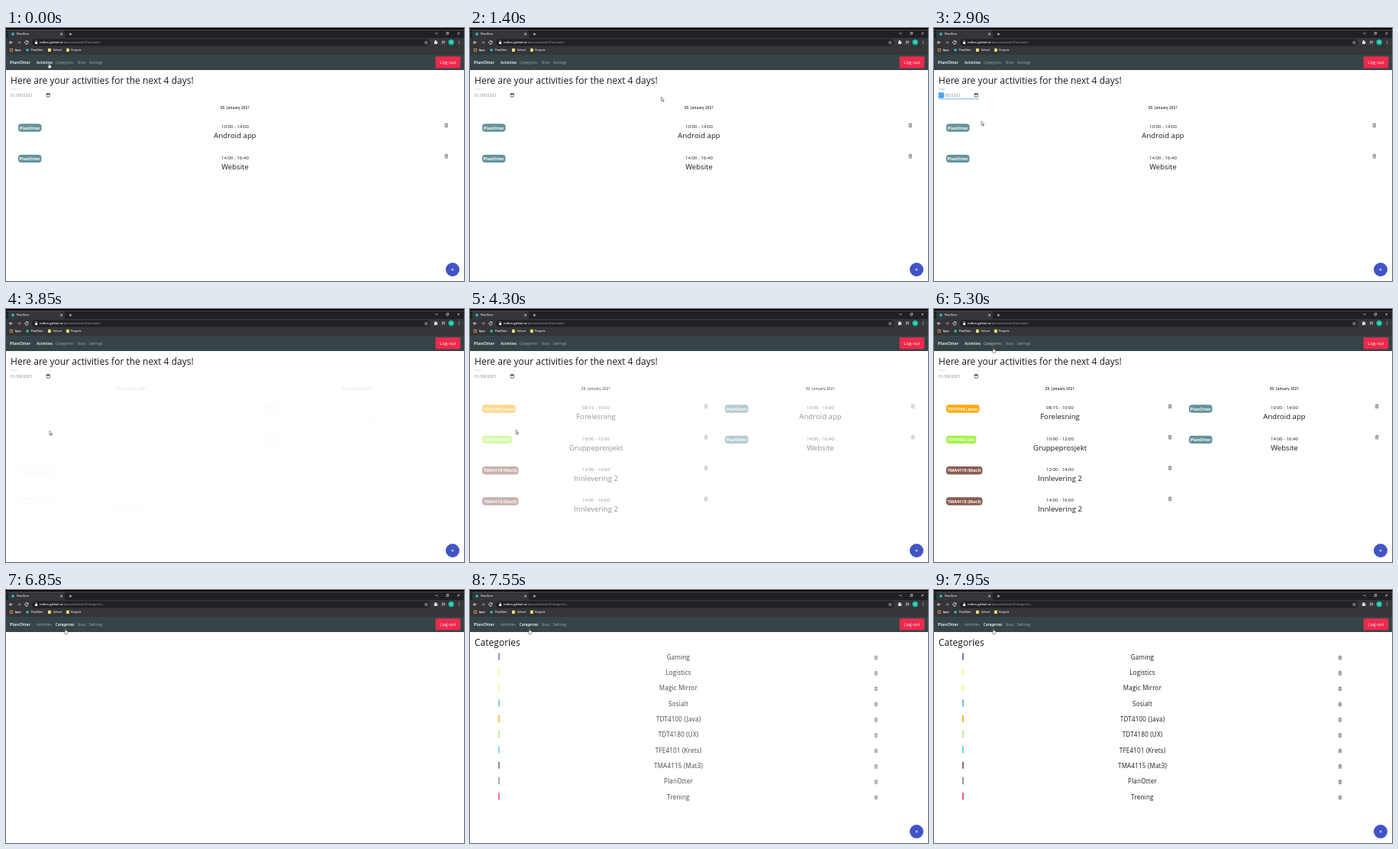
These frames come from a looping animation (600x331 px, 8 s). An HTML page with a canvas:

```html
<!DOCTYPE html>
<html lang="en">
<head>
<meta charset="utf-8">
<title>PlanOtter</title>
<style>
  html, body { margin: 0; width: 100%; height: 100%; overflow: hidden; background: #fff; }
  canvas { display: block; width: 600px; height: 331px; }
</style>
</head>
<body>
<canvas></canvas>
<script>
const LOOP = 8000, STEP = 50;
const CLICK_DATE = 2150, PICK_DATE = 3700, SHOW_DAYS = 3750;
const CLICK_NAV = 5900, LEAVE_PAGE = 6850, SHOW_CATEGORIES = 6900, FADE = 800;

const APP = 'PlanOtter', INK = '#16191c', TEAL = '#1fb5c4';
const canvas = document.querySelector('canvas');
const ctx = canvas.getContext('2d');
const ratio = window.devicePixelRatio || 1;
canvas.width = 600 * ratio;
canvas.height = 331 * ratio;

const own = { badge: APP, color: '#65939a' };
const january29 = {
  title: '29. January 2021',
  items: [
    { badge: 'TDT4100 (Java)', color: '#ffa90a', time: '08:15 - 10:00', name: 'Forelesning' },
    { badge: 'TDT4180 (UX)', color: '#a4f247', time: '10:00 - 12:00', name: 'Gruppeprosjekt' },
    { badge: 'TMA4115 (Mat3)', color: '#8a5a50', time: '12:00 - 14:00', name: 'Innlevering 2' },
    { badge: 'TMA4115 (Mat3)', color: '#8a5a50', time: '14:00 - 16:00', name: 'Innlevering 2' }
  ]
};
const january30 = {
  title: '30. January 2021',
  items: [
    { ...own, time: '10:00 - 14:00', name: 'Android app' },
    { ...own, time: '14:00 - 16:40', name: 'Website' }
  ]
};
const categories = [
  ['Gaming', '#6b7dbd'], ['Logistics', '#f7f99a'], ['Magic Mirror', '#f7f99a'],
  ['Sosialt', '#6fcbae'], ['TDT4100 (Java)', '#f2b53a'], ['TDT4180 (UX)', '#c0e88b'],
  ['TFE4101 (Krets)', '#62dcd2'], ['TMA4115 (Mat3)', '#80706e'],
  [APP, '#8c9a9c'], ['Trening', '#d9567f']
];
const links = [['Activities', 40], ['Categories', 64.7], ['Stats', 93.4], ['Settings', 108.8]];

// Pointer tip: time, x, y
const pointerPath = [
  [700, 56.6, 46], [1050, 250.5, 90.3], [1400, 250.5, 90.3], [2150, 55.5, 87.5],
  [2350, 55.5, 87.5], [2900, 62, 122], [3150, 52.5, 160], [3200, 52.5, 160],
  [3400, 54, 161], [3700, 54, 161], [4000, 60, 158], [4550, 60, 158], [5300, 78, 50.6]
];

const clamp = v => Math.max(0, Math.min(1, v));
const ease = v => v * v * (3 - 2 * v);
const progress = (t, start, length) => clamp((t - start) / length);

function pointerAt(t) {
  const next = pointerPath.findIndex(p => p[0] > t);
  if (next === 0) return pointerPath[0].slice(1);
  if (next < 0) return pointerPath.at(-1).slice(1);
  const [t0, x0, y0] = pointerPath[next - 1], [t1, x1, y1] = pointerPath[next];
  const k = ease((t - t0) / (t1 - t0));
  return [x0 + (x1 - x0) * k, y0 + (y1 - y0) * k];
}

// Text is set at ten times its size and scaled down, for even glyph spacing.
const font = (size, weight) => `${weight} ${size * 10}px "Open Sans", "Noto Sans", sans-serif`;

function text(str, x, y, size, color, { align = 'left', weight = 400, spacing = 0 } = {}) {
  ctx.save();
  ctx.translate(x, y);
  ctx.scale(.1, .1);
  ctx.font = font(size, weight);
  ctx.letterSpacing = spacing * 10 + 'px';
  ctx.textAlign = align;
  ctx.fillStyle = color;
  ctx.fillText(str, 0, 0);
  const width = ctx.measureText(str).width / 10;
  ctx.restore();
  return width;
}

function box(x, y, w, h, color, radius = 0) {
  ctx.fillStyle = color;
  ctx.beginPath();
  ctx.roundRect(x, y, w, h, radius);
  ctx.fill();
}

function circle(x, y, r, color) {
  ctx.fillStyle = color;
  ctx.beginPath();
  ctx.arc(x, y, r, 0, 7);
  ctx.fill();
}

// Fades everything below y towards the white page.
const veil = (y, opacity) => box(0, y, 600, 331 - y, `rgba(255,255,255,${1 - opacity})`);

function stroke(path, x, y, color = '#e8eaed', width = .6) {
  ctx.save();
  ctx.translate(x, y);
  ctx.strokeStyle = color;
  ctx.lineWidth = width;
  ctx.stroke(new Path2D(path));
  ctx.restore();
}

const CROSS = 'M-1.4-1.4L1.4 1.4M1.4-1.4L-1.4 1.4';
const PLUS = 'M-1.7 0H1.7M0-1.7V1.7';

function trash(x, y) {
  stroke('M-2.1-1.6H2.1M-.8-1.7V-2.5H.8V-1.7M-1.6-1.6V2.4H1.6V-1.6M-.5-.5V1.5M.5-.5V1.5', x, y, '#333', .5);
}

function drawBrowser(page) {
  const bold = { weight: 600 };
  box(0, 0, 600, 2.5, '#000');
  box(0, 2.5, 600, 11, '#202124');
  box(3, 3, 74, 12, '#35363a', [2, 2, 0, 0]);
  box(0, 13, 600, 22, '#35363a');
  circle(9, 8, 1.9, TEAL);
  text(APP, 14, 9.3, 3.5, '#e8eaed', bold);
  stroke(CROSS, 72.6, 8, '#fff', .7);
  stroke(PLUS, 84.4, 8, '#fff', .7);
  stroke('M-1.7 0H1.7', 564, 7);
  stroke('M-1.5-.8H.8V1.5H-1.5ZM-.7-.8V-1.6H1.6V.7H.8', 578.3, 7, '#e8eaed', .5);
  stroke(CROSS, 592.8, 7);

  stroke('M2.3 0H-2M0-2L-2 0L0 2', 6.5, 18.9, '#fff', .8);
  stroke('M-2.3 0H2M0-2L2 0L0 2', 17, 18.9, '#9a9da1', .7);
  stroke('M1.6-1.3A2.1 2.1 0 1 0 2 .6M2-2.2V-.7H.4', 27, 18.9, '#fff', .8);
  box(34, 14.6, 521, 8.8, '#202124', 4.4);
  box(38, 18.3, 3.2, 2.7, '#e8eaed', .3);
  stroke('M-.9 0V-1A.9 .9 0 0 1 .9-1V0', 39.6, 18.4, '#e8eaed', .5);
  const width = text('nolbru.github.io', 44, 20.4, 3.9, '#f1f3f4', bold);
  text('/planotterweb/#/' + page, 44 + width, 20.4, 4.07, '#a0a4a8');
  stroke('M0-2.2L.6-.6L2.2-.6L1 .5L1.4 2L0 1.1L-1.4 2L-1 .5L-2.2-.6L-.6-.6Z', 550.4, 19, '#d5d7da', .5);
  box(561, 17.2, 3.6, 3.8, '#e8eaed', .5);
  circle(562.8, 17, .9, '#e8eaed');
  circle(564.7, 19, .9, '#e8eaed');
  stroke('M-2.2-1.6H2M-2.2-.1H1M-2.2 1.4H-.2M1.6-1.4V1.5', 573, 18.9, '#e8eaed', .6);
  circle(583.2, 18.6, 3.7, '#10bfa4');
  text('N', 583.2, 19.8, 3.3, '#fff', { align: 'center' });
  for (const dy of [-1.8, 0, 1.8]) circle(593.3, 18.8 + dy, .5, '#e8eaed');

  for (let i = 0; i < 9; i++)
    box(4.8 + i % 3 * 1.6, 26.8 + Math.floor(i / 3) * 1.6, 1.1, 1.1, i % 2 ? '#f28b50' : '#e9a13b');
  circle(28, 28.8, 1.9, TEAL);
  for (const x of [55, 79]) box(x, 26.8, 3.8, 4.2, '#fbe07c', .4);
  [['Apps', 11.7], [APP, 32.6], ['School', 61.8], ['Projects', 85.2]]
    .forEach(([label, x]) => text(label, x, 30.1, 3.45, '#f1f3f4', bold));
}

function drawNav(t, hovered) {
  box(0, 35, 600, 20, '#364447');
  text(APP, 5, 47.1, 5.8, '#fff', { weight: 600 });
  const toCategories = progress(t, CLICK_NAV, 150);
  links.forEach(([label, x], i) => {
    const active = i === 0 ? 1 - toCategories : i === 1 ? toCategories : 0;
    const base = hovered === i ? .7 : .52;
    text(label, x, 46.7, 4.8, `rgba(255,255,255,${base + (1 - base) * active})`,
      { weight: active > .5 ? 600 : 400 });
  });
  box(562.7, 37.2, 32.6, 15.3, '#ef294d', 1);
  text('Log out', 579, 47.2, 6.1, '#fff', { align: 'center', weight: 500 });
}

function drawTitle(title) {
  text(title, 6, 73.3, 12.05, INK, { weight: 500 });
}

function drawAddButton() {
  circle(585, 316, 9, '#4054c6');
  stroke(PLUS, 585, 316, '#fff', .7);
}

function drawDateField(date, focused) {
  text('Date', 6, 81.3, 3.5, focused ? '#5d9fdc' : '#c4c4c4', { spacing: .2 });
  const style = { spacing: .25 };
  const [month, ...rest] = date.split('/');
  if (focused) {
    box(5.8, 84.6, 6.9, 6.8, '#1e90f0');
    box(6, 92.4, 53, .9, '#3f9be6');
  }
  const width = text(month, 6, 89.9, 5, focused ? '#fff' : '#777', style);
  text('/' + rest.join('/'), 6 + width, 89.9, 5, '#777', style);
  stroke('M-2-1.8H2V2.2H-2Z', 55.2, 88, '#222', .6);
  box(52.9, 85.7, 4.6, 1.4, '#222');
}

function drawDay(day, left, center, trashX) {
  text(day.title, center, 106.2, 4.35, INK, { align: 'center', weight: 600, spacing: .25 });
  day.items.forEach((item, i) => {
    ctx.save();
    ctx.translate(0, i * 40.35);
    ctx.font = font(5.5, 700);
    const width = ctx.measureText(item.badge).width / 10;
    box(left, 125.3, width + 3.6, 10.4, item.color, 4);
    text(item.badge, left + 1.8, 132.5, 5.5, '#fff', { weight: 700 });
    text(item.time, center, 131.2, 6.05, INK, { align: 'center' });
    text(item.name, center, 144.3, 9.6, INK, { align: 'center', weight: 500 });
    trash(trashX, 127.4);
    ctx.restore();
  });
}

function drawActivities(t) {
  if (t >= PICK_DATE && t < SHOW_DAYS) return;
  const picked = t >= PICK_DATE;
  if (picked) {
    drawDay(january29, 16, 165, 309.2);
    drawDay(january30, 334, 459, 580.2);
    // Items fade in inside days that fade in themselves.
    const opacity = progress(t, SHOW_DAYS, FADE);
    veil(112, opacity);
    veil(98, opacity);
  } else {
    drawDay(january30, 16, 300, 576.8);
  }
  drawTitle('Here are your activities for the next 4 days!');
  drawDateField(picked ? '01/29/2021' : '01/30/2021', t >= CLICK_DATE && !picked);
  drawAddButton();
}

function drawCategories(t) {
  if (t < SHOW_CATEGORIES) return;
  categories.forEach(([name, color], i) => {
    const y = 88 + i * 20.32;
    box(37, y - 5.6, 2, 9.2, color);
    text(name, 273, y + 2.8, 8.1, INK, { align: 'center', weight: 500, spacing: .17 });
    trash(532, y + .6);
  });
  veil(78, progress(t, SHOW_CATEGORIES, FADE));
  drawTitle('Categories');
  drawAddButton();
}

function drawPointer(x, y, isHand) {
  const shape = new Path2D(isHand
    ? 'M-.6 .5Q0-.4 .6 .5V2.4L2.4 2.9Q3 3.2 2.8 4.4L2.2 6.8H-.8L-2.2 4.2Q-1.9 3.2-.6 4.2Z'
    : 'M0 0V5.4L1.3 4.3L2.2 6.3L3 5.9L2.1 4H3.8Z');
  ctx.save();
  ctx.translate(x, y);
  ctx.fillStyle = '#fff';
  ctx.fill(shape);
  ctx.strokeStyle = '#222';
  ctx.lineWidth = .5;
  ctx.stroke(shape);
  ctx.restore();
}

function draw(t) {
  ctx.setTransform(ratio, 0, 0, ratio, 0, 0);
  box(0, 0, 600, 331, '#fff');
  const [x, y] = pointerAt(t);
  const hovered = y < 53 ? links.findIndex(([, left]) => x >= left && x <= left + 24) : -1;
  if (t < LEAVE_PAGE) drawActivities(t);
  else drawCategories(t);
  drawBrowser(t < CLICK_NAV ? 'activities' : 'categories');
  drawNav(t, hovered);
  drawPointer(x, y, hovered >= 0);
}

function tick() {
  const t = performance.now() % LOOP;
  draw(Math.floor(t / STEP) * STEP);
  requestAnimationFrame(tick);
}
tick();
</script>
</body>
</html>
```
